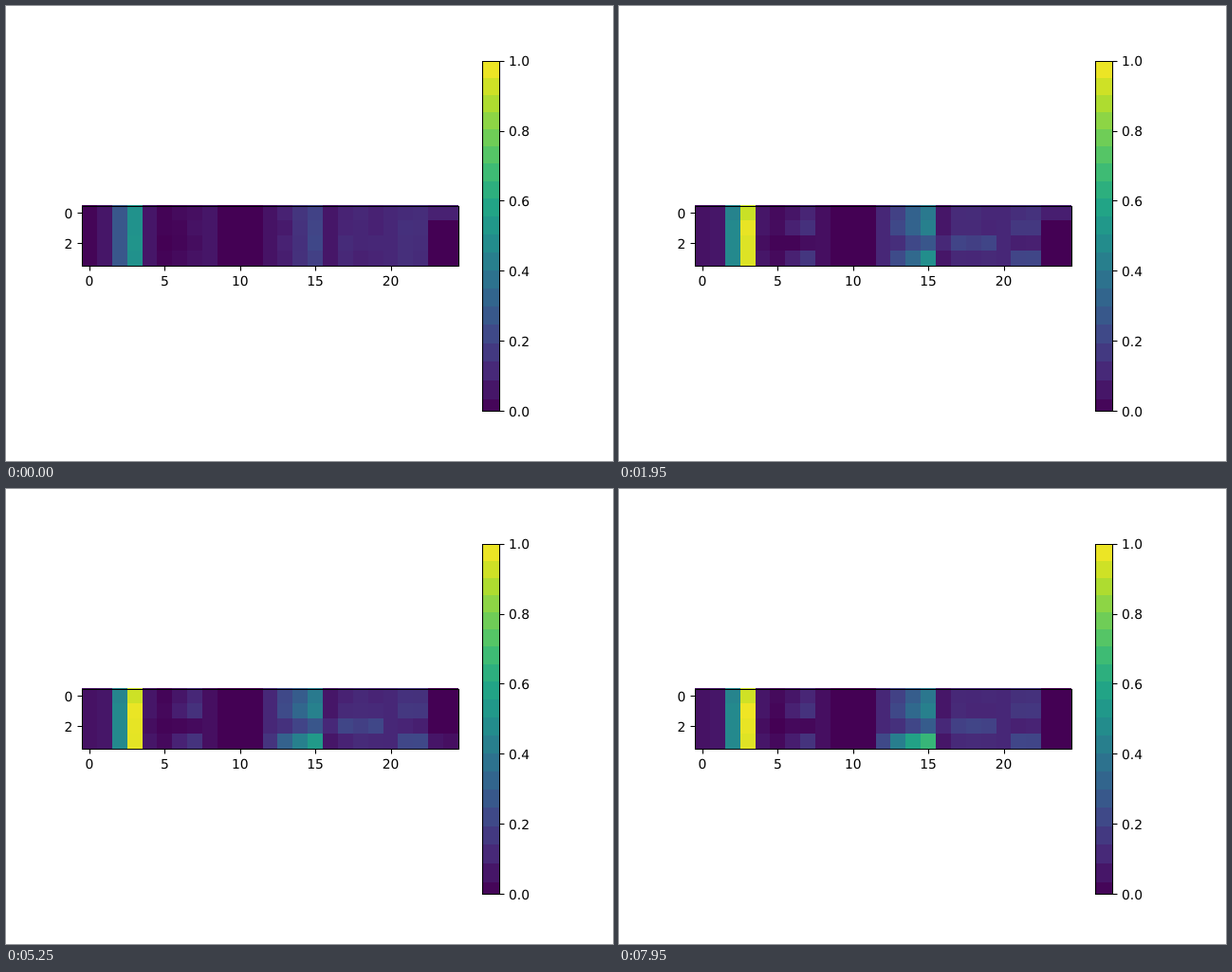
These frames come from a looping animation (640x480 px, 8000 ms). An HTML page:

```html
<!DOCTYPE html>
<html lang="en">
<head>
<meta charset="utf-8">
<title>Heatmap</title>
<style>
  html, body { margin: 0; width: 100%; height: 100%; overflow: hidden; background: #fff; }
  svg { display: block; width: 640px; height: 480px; }
  rect { shape-rendering: crispEdges; }
  path { fill: none; stroke: #000; stroke-width: 1.1; }
  text { font: 13.89px "DejaVu Sans", sans-serif; text-rendering: geometricPrecision; }
</style>
</head>
<body>
<svg id="plot" viewBox="0 0 640 480"></svg>
<script>
const plot = document.getElementById('plot');
const COLS = 25, ROWS = 4, CELL = 397 / COLS, LEFT = 80, TOP = 210.5;
const LOOP = 8000, STEP = 150;

const mix = (a, b, p) => a + (b - a) * p;
const clamp = v => Math.min(1, Math.max(0, v));
const smooth = (start, end, t) => {
  const p = clamp((t - start) / (end - start));
  return p * p * (3 - 2 * p);
};
const noise = (step, row, col) => {
  const n = Math.sin(step * 12.99 + row * 78.23 + col * 37.72) * 43758.55;
  return n - Math.floor(n) - 0.5;
};

// Colour scale: evenly spaced stops from 0 to 1
const stops = '440154 482475 414487 355f8d 2a788e 21918c 22a884 44bf70 7ad151 bddf26 fde725'
  .split(' ').map(hex => [0, 2, 4].map(i => parseInt(hex.slice(i, i + 2), 16)));
function color(value) {
  const x = clamp(value) * 10, i = Math.min(9, Math.floor(x));
  return `rgb(${stops[i].map((c, n) => Math.round(mix(c, stops[i + 1][n], x - i)))})`;
}

function add(tag, attrs, text) {
  const node = document.createElementNS('http://www.w3.org/2000/svg', tag);
  for (const name in attrs) node.setAttribute(name, attrs[name]);
  if (text !== undefined) node.textContent = text;
  return plot.appendChild(node);
}
const box = (x, y, x2, y2, fill) => add('rect', { x, y, width: x2 - x, height: y2 - y, fill });
const line = d => add('path', { d });

// Heatmap cells
const edgeX = c => Math.round(LEFT + c * CELL);
const edgeY = r => Math.round(TOP + r * CELL - 0.1);
const cells = [];
for (let row = 0; row < ROWS; row++)
  for (let col = 0; col < COLS; col++)
    cells.push({ row, col, node: box(edgeX(col), edgeY(row), edgeX(col + 1), edgeY(row + 1), '#440154') });

// Colour bar: stripes get slightly shorter towards the top
const stripeTop = k => k < 0 ? 428 : Math.round(415 - 19.9 * k + 0.06 * k * k);
for (let k = 0; k < 20; k++) {
  const top = stripeTop(k), bottom = stripeTop(k - 1);
  box(502, top, 521, bottom, color((427.2 - (top + bottom) / 2) / 369.6));
}

// Frames, ticks and labels
line('M80.5 211.5H477.5V274.5H80.5Z');
line('M502.5 58.5H520.5V427.5H502.5Z');
for (let v = 0; v <= 20; v += 5) {
  const x = LEFT + (v + 0.5) * CELL;
  line(`M${Math.round(x) + 0.5} 274.5v5`);
  add('text', { x, y: 295, 'text-anchor': 'middle' }, v);
}
for (const v of [0, 2]) {
  const y = TOP + (v + 0.5) * CELL;
  line(`M80.5 ${Math.round(y) + 0.5}h-5`);
  add('text', { x: 70.3, y: Math.round(y + 5.3), 'text-anchor': 'end' }, v);
}
for (let i = 0; i <= 5; i++) {
  const y = 427.2 - i * 73.92;
  line(`M520.5 ${Math.round(y) + 0.5}h5`);
  add('text', { x: 529.9, y: Math.round(y + 5.3) }, (i / 5).toFixed(1));
}

// Column bands: start and end value at both edges, gain per row, amount of flicker
const even = [1, 1, 1, 1];
const bands = [
  { cols: [0, 1], start: [0.01, 0.06], end: [0.05, 0.06], gain: even, flicker: 0 },
  { cols: [2, 2], start: [0.27, 0.27], end: [0.47, 0.47], gain: [0.95, 1, 1, 1], flicker: 0 },
  { cols: [3, 3], start: [0.51, 0.51], end: [0.96, 0.96], gain: [0.97, 1.02, 1, 1], flicker: 0.02 },
  { cols: [4, 4], start: [0.06, 0.06], end: [0.06, 0.06], gain: [1, 1, 0.6, 1], flicker: 0 },
  { cols: [5, 7], start: [0, 0.04], end: [0.02, 0.13], gain: [0.8, 1.1, 0.2, 1.2], flicker: 0.02 },
  { cols: [8, 8], start: [0.06, 0.06], end: [0.04, 0.04], gain: even, flicker: 0 },
  { cols: [12, 12], start: [0.05, 0.05], end: [0.11, 0.11], gain: even, flicker: 0 },
  { cols: [13, 15], start: [0.08, 0.2], end: [0.21, 0.42], gain: [0.97, 1.05, 0.66, 1.13], flicker: 0.03 },
  { cols: [16, 16], start: [0.06, 0.06], end: [0.06, 0.06], gain: [1, 1, 1.9, 1], flicker: 0 },
  { cols: [17, 19], start: [0.11, 0.1], end: [0.11, 0.11], gain: [1, 1, 1.8, 1], flicker: 0.03 },
  { cols: [20, 20], start: [0.11, 0.11], end: [0.11, 0.11], gain: even, flicker: 0 },
  { cols: [21, 22], start: [0.13, 0.13], end: [0.15, 0.15], gain: [0.9, 1.1, 0.6, 1.4], flicker: 0.02 },
];

function cellValue(row, col, time) {
  const lateRise = row === 3 ? smooth(4650, 6150, time) : 0;
  if (col >= 23) {
    const fade = row === 0 ? 0.09 * (1 - smooth(1650, 3600, time)) : 0;
    const flare = lateRise * (1 - smooth(6450, 7950, time));
    return fade + flare * mix(0.16, 0.11, col - 23);
  }
  const band = bands.find(b => col >= b.cols[0] && col <= b.cols[1]);
  if (!band) return 0;
  const grow = 1 - Math.exp(-time / 400);
  const [first, last] = band.cols;
  const across = (col - first) / Math.max(1, last - first);
  const level = mix(mix(...band.start, across), mix(...band.end, across), grow);
  const surge = col >= 12 && col <= 15 ? 1 + lateRise * mix(1, 0.42, (col - 12) / 3) : 1;
  return level * mix(1, band.gain[row], grow) * surge + band.flicker * noise(time / STEP, row, col);
}

function draw() {
  const time = Math.floor((performance.now() % LOOP) / STEP) * STEP;
  for (const { row, col, node } of cells)
    node.setAttribute('fill', color(cellValue(row, col, time)));
  requestAnimationFrame(draw);
}
draw();
</script>
</body>
</html>
```
